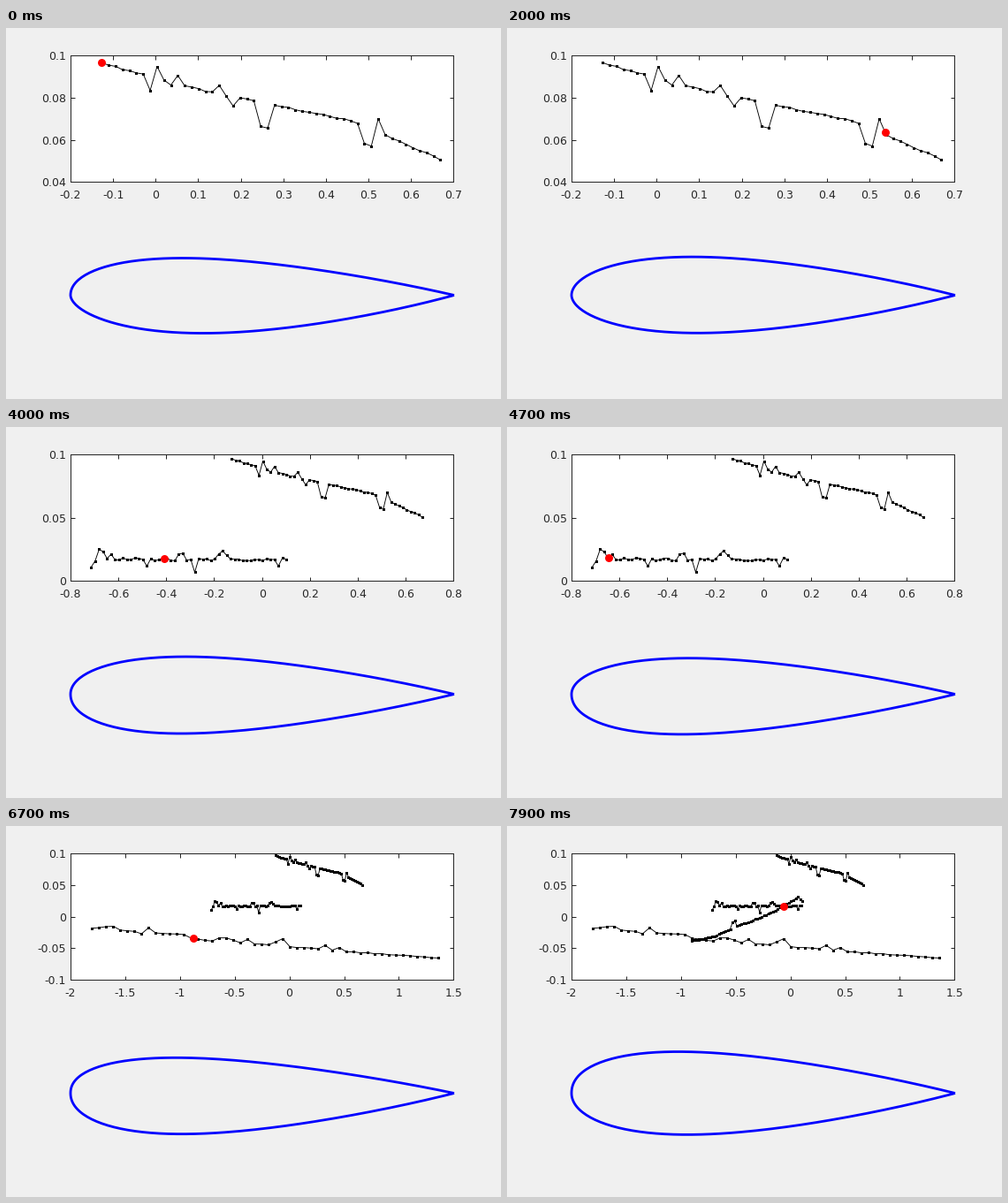
Animation of 560x420 px, one loop 8 s. Source, as a matplotlib script:

```python
import numpy as np
import matplotlib.pyplot as plt
from matplotlib.animation import FuncAnimation

W, H, DPI = 560, 420, 100
PX = 72 / DPI                     # points per pixel
INK = "#262626"
STEPS, FRAMES, POINTS = 25, 80, 50
NOSE, CHORD, MID = 73, 434, 302.5
LEFT, RIGHT, TOP, BOTTOM = 72.9, 506.4, 31, 174.3

plt.rcParams["font.family"] = "DejaVu Sans"
rng = np.random.default_rng(4)


def curve(x0, x1, trend, jolts, noise):
    """A piecewise trend with a few single jolts and light jitter."""
    y = np.interp(np.arange(POINTS), list(trend), list(trend.values()))
    y += rng.uniform(-noise, noise, POINTS)
    for i, d in jolts.items():
        y[i] += d
    return np.linspace(x0, x1, POINTS), y * 1e-4


falling = curve(-0.1264, 0.669,
                {0: 962, 15: 830, 26: 757, 36: 690, 43: 595, 49: 505},
                {7: -64, 8: 53, 10: -18, 11: 40, 17: 38, 19: -44,
                 23: -111, 24: -115, 38: -80, 39: -77, 40: 62}, 4)
level = curve(-0.7134, 0.1014, {0: 170},
              {0: -66, 2: 70, 3: 60, 5: 47, 14: -47, 22: 35, 23: 46,
               26: -91, 32: 45, 33: 68, 34: 37, 47: -55}, 12)
wide = curve(-1.8024, 1.3589,
             {0: -178, 3: -150, 4: -215, 13: -286, 14: -342, 17: -382,
              25: -445, 36: -550, 49: -655},
             {7: -35, 8: 75, 18: 55, 19: 58, 20: 36, 22: 58,
              26: 56, 27: 115, 33: 70, 35: 50}, 6)
rising = curve(-0.90, 0.11,
               {0: -385, 11: -305, 13: -250, 23: -110, 30: -20,
                41: 175, 47: 310, 49: 250},
               {18: 85, 19: 95}, 8)
CURVES = [falling, level, wide, rising]

# x limits and step, y limits and step
VIEWS = [(-.2, .7, .1, .04, .1, .02),
         (-.8, .8, .2, 0, .1, .05),
         (-2, 1.5, .5, -.1, .1, .05),
         (-2, 1.5, .5, -.1, .1, .05)]

# Two poses per stage: step, upper and lower (thickness, x of the thickest point)
POSES = [((0, (42.0, 200), (43.0, 223)), (20, (43.4, 210), (42.8, 216))),
         ((7, (44.4, 200), (43.5, 198)), (22, (40.8, 206), (45.4, 198))),
         ((8, (44.0, 188), (41.8, 208)), (17, (40.2, 192), (46.2, 199))),
         ((0, (47.6, 193), (46.2, 205)), (4, (47.0, 194), (46.9, 204)))]

u = (1 - np.cos(np.linspace(0, np.pi, 120))) / 2


def side(height, peak):
    """Four-digit wing section, warped so its thickest point sits at peak."""
    w = u ** (np.log(0.3) / np.log((peak - NOSE) / CHORD))
    section = (0.2969 * np.sqrt(w) - 0.126 * w - 0.3516 * w**2
               + 0.2843 * w**3 - 0.1036 * w**4)
    return height * section / section.max()


def outline(stage, step):
    (s0, *a), (s1, *b) = POSES[stage]
    k = (step - s0) / (s1 - s0)
    up, low = [(1 - k) * side(*p) + k * side(*q) for p, q in zip(a, b)]
    x = NOSE + CHORD * u
    return np.r_[x[::-1], x[1:]], np.r_[MID - up[::-1], MID + low[1:]]


def ticks(lo, hi, step):
    t = np.round(lo + step * np.arange(round((hi - lo) / step) + 1), 3) + 0.0
    return t, [f"{v:g}" for v in t]


fig = plt.figure(figsize=(W / DPI, H / DPI), dpi=DPI, facecolor="#f0f0f0")

ax = fig.add_axes([LEFT / W, 1 - BOTTOM / H,
                   (RIGHT - LEFT) / W, (BOTTOM - TOP) / H])
ax.tick_params(direction="in", top=True, right=True, length=4.5 * PX,
               width=PX, color=INK, labelcolor=INK, labelsize=12.5 * PX)
ax.tick_params(axis="x", pad=8.5 * PX)
ax.tick_params(axis="y", pad=5 * PX)
for spine in ax.spines.values():
    spine.set(color=INK, linewidth=PX)

lines = [ax.plot(*c, "k-s", lw=0.9 * PX, ms=3 * PX, mew=0)[0] for c in CURVES]
dot, = ax.plot([], [], "o", color="red", ms=9 * PX, mew=0, zorder=5)

wing_ax = fig.add_axes([0, 0, 1, 1])
wing_ax.set(xlim=(0, W), ylim=(H, 0))
wing_ax.axis("off")
wing, = wing_ax.plot([], [], color="blue", lw=2.8 * PX,
                     solid_capstyle="butt", solid_joinstyle="round")


def draw(i):
    stage, step = divmod(i, STEPS)
    x0, x1, dx, y0, y1, dy = VIEWS[stage]
    ax.set_xticks(*ticks(x0, x1, dx))
    ax.set_yticks(*ticks(y0, y1, dy))
    ax.set(xlim=(x0, x1), ylim=(y0, y1))
    for n, line in enumerate(lines):
        line.set_visible(n <= stage)

    # The first sweep runs right, the others left
    cx, cy = CURVES[stage]
    k = step / (STEPS - 1)
    if stage:
        k = 1 - k
    x = cx[0] + k * (cx[-1] - cx[0])
    dot.set_data([x], [np.interp(x, cx, cy)])
    wing.set_data(*outline(stage, step))
    return [*lines, dot, wing]


anim = FuncAnimation(fig, draw, frames=FRAMES, interval=100,
                     repeat=True, repeat_delay=0, blit=False)
plt.show()
```
